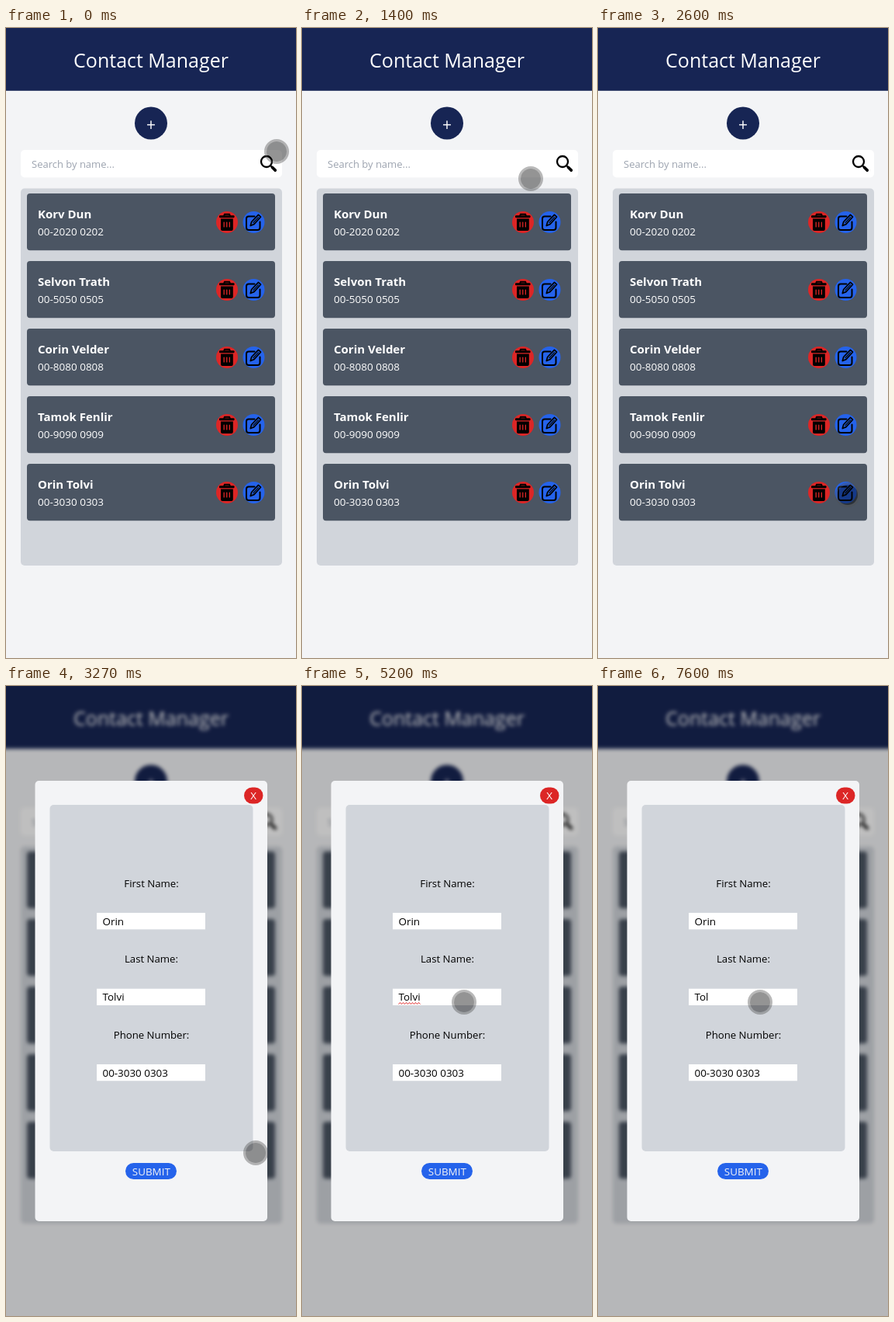
An HTML page with a canvas that plays this animation: 374 px wide and 811 px high, repeating every 8000 ms.

```html
<!DOCTYPE html>
<html lang="en">
<head>
<meta charset="utf-8">
<title>Contact Manager</title>
<style>
  html, body { margin: 0; width: 100%; height: 100%; overflow: hidden; background: #f3f4f6; }
  canvas { display: block; }
</style>
</head>
<body>
<canvas id="stage" width="374" height="811"></canvas>
<script>
const W = 374, H = 811, LOOP = 8000, STEP = 1000 / 15;
const NAVY = '#172554', PALE = '#f3f4f6', PANEL = '#d1d5db', CARD = '#4b5563';
const RED = '#dc2626', BLUE = '#2563eb';
const FONT = '"Open Sans", "Noto Sans", sans-serif';
const ctx = document.getElementById('stage').getContext('2d');

const contacts = [
  ['Korv Dun', '00-2020 0202'],
  ['Selvon Trath', '00-5050 0505'],
  ['Corin Velder', '00-8080 0808'],
  ['Tamok Fenlir', '00-9090 0909'],
  ['Orin Tolvi', '00-3030 0303']
];

// Pointer path: step, x, y
const path = [
  [0, 349, 159], [5, 299, 105], [16, 299, 105], [21, 295, 194], [29, 303, 449],
  [39, 322, 601], [53, 322, 601], [59, 247, 472], [65, 209, 409], [66, 209, 409],
  [67, 209, 407], [120, 209, 407]
];

function box(c, x, y, w, h, r, fill) {
  c.fillStyle = fill;
  c.beginPath();
  c.roundRect(x, y, w, h, r);
  c.fill();
}

function disc(c, x, y, r, fill) {
  c.fillStyle = fill;
  c.beginPath();
  c.arc(x, y, r, 0, 7);
  c.fill();
}

function line(c, points, width, close) {
  c.lineWidth = width;
  c.beginPath();
  points.forEach(([x, y]) => c.lineTo(x, y));
  if (close) c.closePath();
  c.stroke();
}

function text(c, str, x, y, size, fill, align = 'left', weight = 400) {
  c.font = `${weight} ${size}px ${FONT}`;
  c.fillStyle = fill;
  c.textAlign = align;
  c.fillText(str, x, y);
}

function trash(c, x, y) {
  disc(c, x, y, 14, RED);
  c.strokeStyle = '#000';
  line(c, [[x - 4, y - 8], [x - 3, y - 10.2], [x + 3, y - 10.2], [x + 4, y - 8]], 2);
  box(c, x - 10, y - 8.8, 19.5, 3, 1, '#000');
  box(c, x - 8, y - 4.6, 15.8, 15.6, [0, 0, 2, 2], '#000');
  for (const dx of [-4, -0.4, 3.2]) box(c, x + dx - 0.5, y - 0.5, 1.3, 7, 0.6, RED);
}

function pencil(c, x, y) {
  disc(c, x, y, 14, BLUE);
  c.strokeStyle = '#000';
  c.lineCap = c.lineJoin = 'round';
  c.lineWidth = 2;
  c.beginPath();
  c.moveTo(x + 1, y - 7.5);
  c.lineTo(x - 6.5, y - 7.5);
  c.quadraticCurveTo(x - 9.5, y - 7.5, x - 9.5, y - 4.5);
  c.lineTo(x - 9.5, y + 7);
  c.quadraticCurveTo(x - 9.5, y + 10, x - 6.5, y + 10);
  c.lineTo(x + 5, y + 10);
  c.quadraticCurveTo(x + 8, y + 10, x + 8, y + 7);
  c.lineTo(x + 8, y - 0.5);
  c.stroke();
  line(c, [[x - 4.2, y + 4.5], [x - 2.8, y - 0.5], [x + 6, y - 9.6], [x + 9, y - 6.8], [x + 0.4, y + 2.6]], 1.7, true);
  line(c, [[x - 0.6, y + 0.6], [x + 6, y - 6.3]], 1.1);
  c.lineCap = 'butt';
  c.lineJoin = 'miter';
}

function magnifier(c) {
  c.strokeStyle = '#000';
  c.lineWidth = 2.3;
  c.beginPath();
  c.arc(336, 172, 7, 0, 7);
  c.stroke();
  c.lineCap = 'round';
  line(c, [[341, 177], [343, 179]], 2);
  line(c, [[343.5, 179.5], [347.2, 183.2]], 3.8);
  c.lineCap = 'butt';
}

function drawPage(c) {
  c.fillStyle = PALE;
  c.fillRect(-20, -20, W + 40, H + 40);
  c.fillStyle = NAVY;
  c.fillRect(-20, -20, W + 40, 100.8);
  text(c, 'Contact Manager', W / 2, 51, 25, '#fff', 'center');
  disc(c, 187, 122.5, 21, NAVY);
  text(c, '+', 187, 132, 21, '#fff', 'center');
  box(c, 19, 157, 337, 35.5, 5, '#fff');
  text(c, 'Search by name...', 33, 180, 13, '#9ca3af');
  magnifier(c);
  box(c, 19, 206.5, 337, 485.5, 5, PANEL);
  contacts.forEach(([name, phone], i) => {
    const y = 213 + 87 * i;
    box(c, 27, y, 320, 73.3, 4, CARD);
    text(c, name, 41, y + 32, 15, '#fff', 'left', 700);
    text(c, phone, 41, y + 54, 13.5, '#fff');
    trash(c, 285, y + 37);
    pencil(c, 319.5, y + 37);
  });
}

function layer() {
  const el = document.createElement('canvas');
  el.width = W + 40;
  el.height = H + 40;
  const c = el.getContext('2d');
  return [el, c];
}

const [page, pageCtx] = layer();
pageCtx.translate(20, 20);
drawPage(pageCtx);

const [dimmed, dimCtx] = layer();
dimCtx.filter = 'blur(2.7px)';
dimCtx.drawImage(page, 0, 0);
dimCtx.filter = 'none';
dimCtx.fillStyle = 'rgba(0,0,0,.25)';
dimCtx.fillRect(0, 0, W + 40, H + 40);

function field(label, value, y) {
  text(ctx, label, 187.5, y - 33.5, 13.2, '#000', 'center');
  ctx.fillStyle = '#fff';
  ctx.fillRect(117, y, 140, 21.3);
  text(ctx, value, 124.5, y + 15.5, 13.4, '#000');
  return 124.5 + ctx.measureText(value).width;
}

function squiggle(x0, x1, y) {
  const points = [];
  for (let x = x0, up = 0; x <= x1; x += 2, up ^= 1) points.push([x, y - up * 2]);
  ctx.strokeStyle = '#e02020';
  line(ctx, points, 1);
}

function drawForm(t) {
  box(ctx, 37.5, 122, 299.5, 567, 5, PALE);
  box(ctx, 56.5, 153, 262, 446, 5, PANEL);
  box(ctx, 307, 130.5, 24.5, 21, 10.5, RED);
  text(ctx, 'X', 319.2, 146, 13.4, '#fff', 'center');

  const [first, last] = contacts[4][0].split(' ');
  const cut = t >= 6400 ? 2 : t >= 6070 ? 1 : 0;
  field('First Name:', first, 292);
  const end = field('Last Name:', last.slice(0, last.length - cut), 389.7);
  field('Phone Number:', contacts[4][1], 487);

  if (t >= 4670 && t < 6070) squiggle(124.5, end, 409.5);
  const caret = (t >= 4670 && t < 5200) || (t >= 5670 && t < 6600) || (t >= 7130 && t < 7600);
  if (caret) {
    ctx.fillStyle = '#000';
    ctx.fillRect(Math.round(end), 391, 1, 18);
  }

  box(ctx, 154, 614, 66, 21, 10.5, BLUE);
  text(ctx, 'SUBMIT', 187.3, 630, 13.4, PALE, 'center');
}

// Monotone slope at a path point, per axis
function slope(i, axis) {
  if (i === 0 || i === path.length - 1) return 0;
  const rate = j => (path[j + 1][axis] - path[j][axis]) / (path[j + 1][0] - path[j][0]);
  const a = rate(i - 1), b = rate(i);
  return a * b > 0 ? 2 * a * b / (a + b) : 0;
}

function along(k, axis) {
  let i = 0;
  while (i < path.length - 2 && k > path[i + 1][0]) i++;
  const a = path[i], b = path[i + 1], d = b[0] - a[0];
  const u = (k - a[0]) / d, v = 1 - u;
  return v * v * (1 + 2 * u) * a[axis] + u * u * (3 - 2 * u) * b[axis]
    + d * u * v * (v * slope(i, axis) - u * slope(i + 1, axis));
}

function drawPointer(k) {
  const x = along(k, 1), y = along(k, 2);
  ctx.strokeStyle = 'rgba(80,80,80,.4)';
  ctx.lineWidth = 3;
  ctx.beginPath();
  ctx.arc(x, y, 14.5, 0, 7);
  ctx.stroke();
  disc(ctx, x, y, 13, 'rgba(0,0,0,.42)');
}

function draw(t) {
  const open = t >= 3266;
  ctx.drawImage(open ? dimmed : page, -20, -20);
  if (open) drawForm(t);
  drawPointer(Math.floor((t + 4) / STEP));
}

const start = performance.now();
function tick() {
  draw((performance.now() - start) % LOOP);
  requestAnimationFrame(tick);
}
tick();
</script>
</body>
</html>
```
